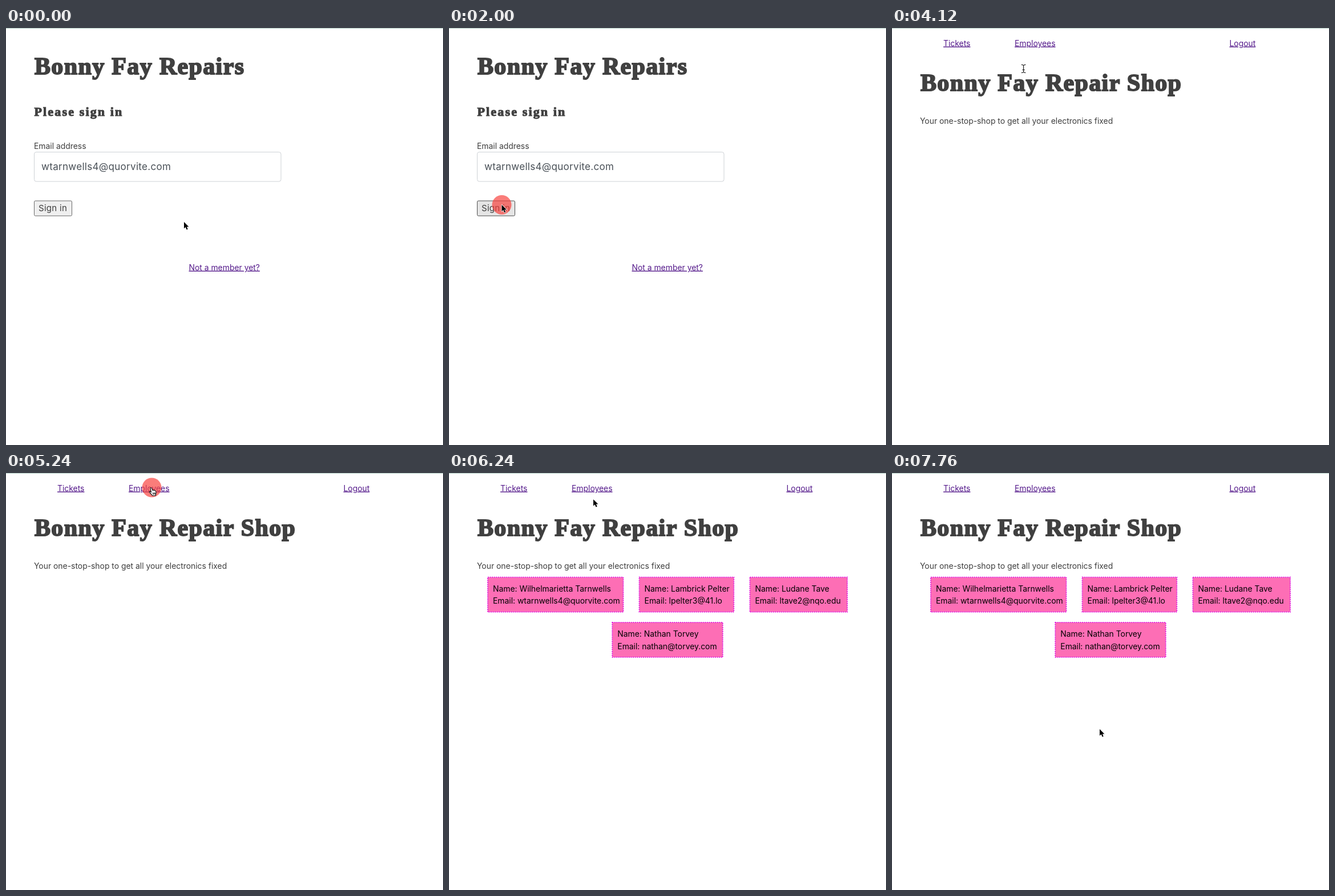
Write an HTML page that moves like this. It is 766 px wide and 731 px high and loops after 8000 ms.

```html
<!DOCTYPE html>
<html lang="en">
<head>
<meta charset="utf-8">
<title>Repair shop sign in</title>
<style>
  html, body { margin: 0; height: 100%; overflow: hidden; background: #fff; }
  svg { display: block; width: 100%; height: 100%; }
  text { font: 13.9px Inter, sans-serif; fill: #3e3e3e; white-space: pre; }
  .h1, .h2 { font: bold 42px "Liberation Serif", serif; letter-spacing: 1.35px; fill: #404040; stroke: #404040; stroke-width: 2px; stroke-linejoin: miter; }
  .h2 { font-size: 22px; letter-spacing: 2.15px; stroke-width: 1.1px; }
  .link { fill: #551a8b; text-decoration: underline; }
  .field { font-size: 17px; letter-spacing: .3px; fill: #495057; }
  .button { font-size: 15px; letter-spacing: .3px; }
  .card text { fill: #000; }
  .card rect { fill: #fd6eb5; stroke: #e01fe0; stroke-width: 1.8; stroke-dasharray: 2 1.6; }
</style>
</head>
<body>
<svg viewBox="0 0 766 731">
  <rect width="766" height="1" fill="#b3cfc5"/>
  <g id="login">
    <text class="h1" x="50" y="81">Bonny Fay Repairs</text>
    <text class="h2" x="49.5" y="153.7">Please sign in</text>
    <text x="49" y="212">Email address</text>
    <rect x="49.5" y="217.5" width="432.5" height="51.5" rx="3.6" fill="#fff" stroke="#ced2d6"/>
    <text class="field" x="62" y="249">wtarnwells4@quorvite.com</text>
    <rect id="button" x="49.5" y="303" width="66" height="26.3" rx="2" stroke="#6b6b6b"/>
    <text class="button" x="57" y="321">Sign in</text>
    <text class="link" x="320.5" y="424.5">Not a member yet?</text>
  </g>
  <g id="home">
    <text class="link" x="90" y="31.5">Tickets</text>
    <text class="link" x="215" y="31.5">Employees</text>
    <text class="link" x="591.5" y="31.5">Logout</text>
    <text class="h1" x="50" y="110">Bonny Fay Repair Shop</text>
    <text x="49" y="168.3">Your one-stop-shop to get all your electronics fixed</text>
  </g>
  <g id="cards"></g>
  <circle id="click" r="17" fill="#f8403c"/>
  <g id="pointer" stroke-linejoin="round" stroke-linecap="round">
    <path id="arrow" d="M0 0V11.6L2.7 9.1 4.6 13.6 6.7 12.7 4.8 8.4H8.4Z" fill="#000" stroke="#fff" stroke-width="1.4" paint-order="stroke"/>
    <path id="beam" d="M-3.3 -7Q-.6 -7 0 -5.5Q.6 -7 3.3 -7M0 -5.5V5.5M-3.3 7Q-.6 7 0 5.5Q.6 7 3.3 7M-1.6 2H1.6" fill="none" stroke="#222" stroke-width="1.2"/>
    <path id="hand" d="M-2.6 1.2Q-1.4 -.7 -.1 1L1.5 5Q2.5 3.7 3.4 5Q4.5 3.9 5.2 5.3Q6.6 4.8 7 6.6Q8.3 9.4 7 11.5L6.9 14.2H.9Q.4 12.4 -1.5 11L-4.2 8.2Q-4.7 6.5 -2.7 7L-.9 8.4ZM2 9.4L2.6 12M4 9.2L4.3 11.8M5.8 9L5.9 11.5" fill="#fff" stroke="#111" stroke-width="1.1"/>
  </g>
</svg>
<script>
const LOOP = 8000, HOME = 2280, CARDS = 5410;
const $ = id => document.getElementById(id);

const card = (x, y, w, name, email) => `<g class="card" transform="translate(${x} ${y})">
  <rect x=".9" y=".9" width="${w - 1.8}" height="61"/>
  <text x="10" y="26.2">Name: ${name}</text><text x="10" y="47.7">Email: ${email}</text></g>`;
$("cards").innerHTML =
  card(67, 181.8, 239.4, "Wilhelmarietta Tarnwells", "wtarnwells4@quorvite.com") +
  card(332.6, 181.8, 167.6, "Lambrick Pelter", "lpelter3@41.lo") +
  card(526.5, 181.8, 172.5, "Ludane Tave", "ltave2@nqo.edu") +
  card(285.3, 261, 195.4, "Nathan Torvey", "nathan@torvey.com");

// Pointer path: time, x, y
const path = [
  [0, 312, 340], [350, 312, 340], [700, 218, 321], [1150, 112, 303], [1410, 92.5, 310],
  [3060, 92.5, 310], [3450, 140, 232], [3850, 203, 140], [4120, 230.5, 71.5], [4680, 253, 31],
  [5100, 255.5, 25.5], [5260, 255.5, 25.5], [5480, 255, 19], [5820, 254, 18], [6060, 253, 26],
  [6240, 253, 46], [6850, 275, 149], [7680, 342, 440], [7760, 364, 449], [LOOP, 364, 449]
];

const rate = (i, k) => (path[i + 1][k] - path[i][k]) / (path[i + 1][0] - path[i][0]);

// Slope that never overshoots a waypoint
function slope(i, k) {
  if (i === 0 || i === path.length - 1) return 0;
  const a = rate(i - 1, k), b = rate(i, k);
  return a * b > 0 ? 2 * a * b / (a + b) : 0;
}

function at(t, k) {
  let i = 0;
  while (i < path.length - 2 && t >= path[i + 1][0]) i++;
  const a = path[i], b = path[i + 1], h = b[0] - a[0], u = (t - a[0]) / h, v = 1 - u;
  return v * v * ((1 + 2 * u) * a[k] + u * h * slope(i, k)) +
         u * u * ((1 + 2 * v) * b[k] - v * h * slope(i + 1, k));
}

function pointerKind(t, x, y) {
  const inside = (l, top, r, b) => x >= l && x <= r && y >= top && y <= b;
  if (t < HOME) return "arrow";
  if (inside(215, 16, 286, 36)) return "hand";
  const overText = inside(49, 64, 506, 126) || inside(49, 154, 387, 174) ||
    t >= CARDS && (inside(77, 194, 296, 233) || inside(295, 273, 471, 312));
  return overText ? "beam" : "arrow";
}

const show = (id, on) => $(id).setAttribute("visibility", on ? "visible" : "hidden");
const clamp = v => Math.max(0, Math.min(1, v));
const pulse = (t, from, to) => clamp(Math.min((t - from) / 70, (to - t) / 100));

function draw(t) {
  const x = at(t, 1), y = at(t, 2), kind = pointerKind(t, x, y);
  show("login", t < HOME);
  show("home", t >= HOME);
  show("cards", t >= CARDS);
  for (const id of ["arrow", "beam", "hand"]) show(id, id === kind);
  $("pointer").setAttribute("transform", `translate(${x} ${y})`);

  const hover = x < 116 && y > 302;
  $("button").setAttribute("fill", hover ? "#e5e5e5" : "#efefef");
  $("button").setAttribute("stroke", hover ? "#4f4f4f" : "#6b6b6b");

  const glow = Math.max(pulse(t, 1870, 2230), pulse(t, 5090, 5430));
  $("click").setAttribute("cx", x);
  $("click").setAttribute("cy", y);
  $("click").setAttribute("opacity", .68 * glow);
}

const start = performance.now();
function tick() {
  draw((performance.now() - start) % LOOP);
  requestAnimationFrame(tick);
}
tick();
</script>
</body>
</html>
```
